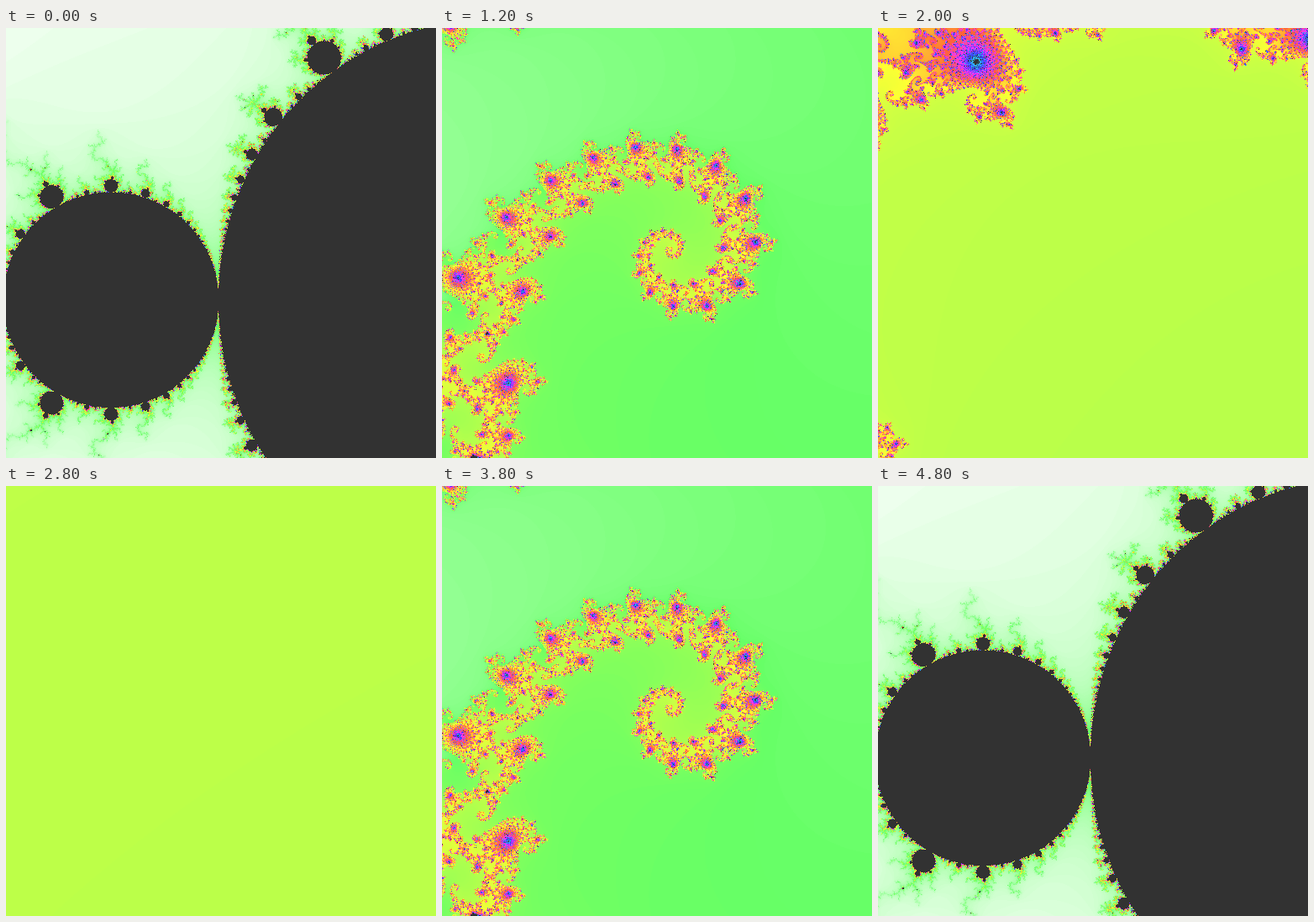
Recreate the animation shown at these times as an HTML page with a canvas. Size 512x512 px, loop 5 s.

```html
<!DOCTYPE html>
<html lang="en">
<head>
<meta charset="utf-8">
<title>Mandelbrot zoom</title>
<style>
html, body { margin: 0; width: 100%; height: 100%; overflow: hidden; background: #323232; }
canvas { display: block; width: 512px; height: 512px; }
</style>
</head>
<body>
<canvas id="view" width="512" height="512"></canvas>
<script>
const SIZE = 512, LOOP = 5000, STEP = 200, MAX = 620;
const CENTER = { x: -0.743388, y: 0.131288 };

// evenly spaced along a power curve of the iteration count
const COLORS = ['#ffffff', '#66ff66', '#ffff32', '#ff6432', '#ff32ff', '#3232ff', '#32c8ff', '#323232'];
const CURVE = 0.77;

const ctx = document.getElementById('view').getContext('2d');
const rgb = COLORS.map(c => [1, 3, 5].map(i => parseInt(c.slice(i, i + 2), 16)));

function colorAt(n) {
  const u = (rgb.length - 1) * Math.pow(n / MAX, CURVE);
  const i = Math.min(Math.floor(u), rgb.length - 2), f = u - i;
  const [r, g, b] = rgb[i].map((v, k) => Math.round(v + (rgb[i + 1][k] - v) * f));
  return (255 << 24 | b << 16 | g << 8 | r) >>> 0;
}
const palette = Uint32Array.from({ length: MAX + 1 }, (_, n) => colorAt(n));

function inBody(x, y) {
  const y2 = y * y, d = x - 0.25, q = d * d + y2;
  return q * (q + d) <= y2 / 4 || (x + 1) * (x + 1) + y2 <= 1 / 16;
}

function escapeCount(cx, cy) {
  if (inBody(cx, cy)) return MAX;
  let x = 0, y = 0, x2 = 0, y2 = 0, n = 0;
  while (x2 + y2 <= 4 && n < MAX) {
    y = 2 * x * y + cy;
    x = x2 - y2 + cx;
    x2 = x * x;
    y2 = y * y;
    n++;
  }
  return n;
}

function render(level) {
  const img = new ImageData(SIZE, SIZE);
  const px = new Uint32Array(img.data.buffer);
  const unit = Math.pow(10, -level / 2) / SIZE, half = SIZE / 2;
  for (let j = 0, p = 0; j < SIZE; j++) {
    const cy = CENTER.y + (half - j) * unit;
    for (let i = 0; i < SIZE; i++) {
      px[p++] = palette[escapeCount(CENTER.x + (i - half) * unit, cy)];
    }
  }
  return img;
}

// zoom in over the first half, back out over the second
function levelAt(ms) {
  const slot = Math.floor((ms % LOOP) / STEP);
  return Math.max(0, Math.min(slot - 1, 24 - slot));
}

const cache = [];
let shown = -1;
function show(ms) {
  const level = levelAt(ms);
  if (level === shown) return;
  cache[level] = cache[level] || render(level);
  ctx.putImageData(cache[level], 0, 0);
  shown = level;
}

const start = performance.now();
function tick() {
  show(performance.now() - start);
  requestAnimationFrame(tick);
}
tick();
</script>
</body>
</html>
```
